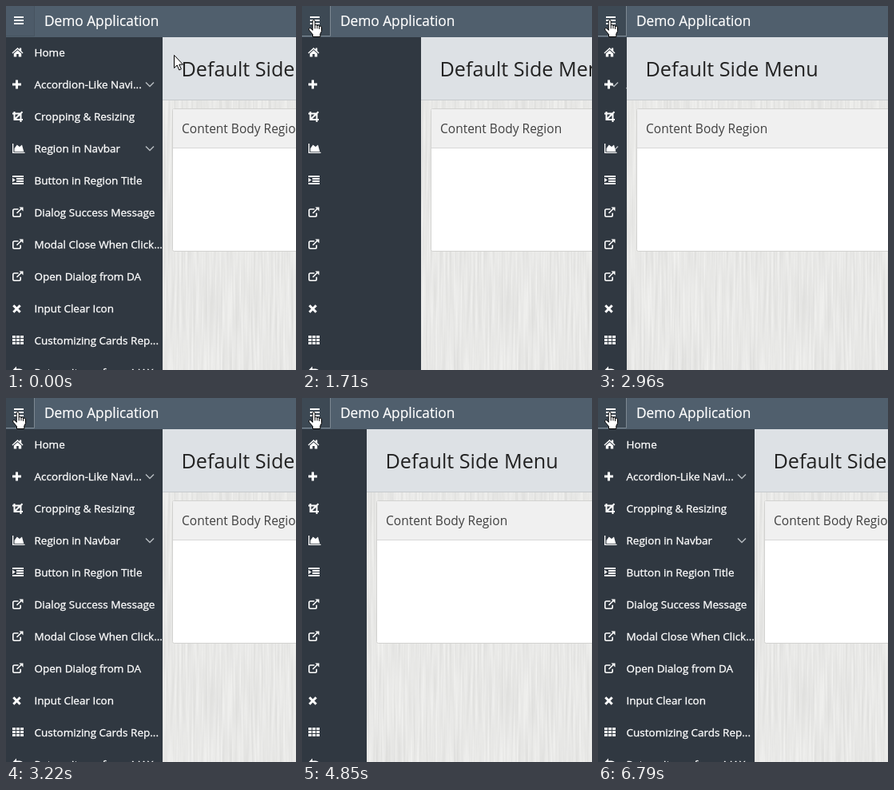
Animation, 363 px wide and 455 px high, one loop 7780 ms. Source, as an HTML page:

```html
<!DOCTYPE html>
<html lang="en">
<head>
<meta charset="utf-8">
<title>Collapsing side menu</title>
<style>
html, body { margin: 0; width: 100%; height: 100%; overflow: hidden; background: #e8e8e6; }
svg { display: block; font-family: "Open Sans", "Noto Sans", sans-serif; }
#labels text { font-size: 13.5px; fill: #fff; stroke: #fff; stroke-width: .3; }
.line { fill: none; stroke: #fff; stroke-width: 2; }
</style>
</head>
<body>
<svg width="363" height="455" viewBox="0 0 363 455">
  <defs>
    <filter id="wood" x="0" y="0" width="100%" height="100%" color-interpolation-filters="sRGB">
      <feTurbulence type="fractalNoise" baseFrequency="0.4 0.012" numOctaves="2" seed="4"/>
      <feColorMatrix values=".12 0 0 0 .85  .12 0 0 0 .85  .12 0 0 0 .843  0 0 0 0 1"/>
    </filter>
    <clipPath id="clip"><rect id="clipBox" y="39" height="416"/></clipPath>
  </defs>

  <rect width="363" height="455" filter="url(#wood)"/>

  <g id="page">
    <rect y="39" width="363" height="79" fill="#dde1e5"/>
    <rect y="117" width="363" height="1" fill="#c6cacd"/>
    <text x="23.4" y="88" font-size="25.2" fill="#222">Default Side Menu</text>
    <rect x="12.5" y="128.5" width="400" height="178" rx="2" fill="#fff" stroke="#d2d2d0"/>
    <rect x="13" y="129" width="400" height="48" fill="#f0f0f0"/>
    <rect x="13" y="177" width="400" height="1" fill="#d8d8d8"/>
    <text x="24" y="159" font-size="15.5" fill="#404040">Content Body Region</text>
  </g>

  <rect id="side" y="39" height="416" fill="#303841"/>
  <g id="labels" clip-path="url(#clip)"></g>
  <g id="icons" fill="#fff">
    <path d="M7.500 58.500L14.500 52l2.500 2.300V52.500h2.200v3.800l2.300 2.200-.8 1L14.500 54 8.300 59.500zM9.800 59.500l4.700-4.200 4.700 4.200V63.500h-3.400v-3.500h-2.600v3.500H9.800z"/>
    <path d="M12 92.500h3V96.500h4v3h-4v4h-3v-4H8v-3h4z"/>
    <path class="line" d="M8 134.500H18.500V145M10.500 132V142H21M10.500 142L20.500 132.200"/>
    <path d="M8 172h1.300v10.700H23.500V184H8zM10.500 182v-4l3.300-4.500 3.200 2.500 3-2.500L22.300 182z"/>
    <path d="M8 212h14v2H8zM13 215h9v2h-9zM13 218h9v2h-9zM8 221h14v2H8zM8 214.800l3.800 2.700L8 220.300z"/>
    <path class="line" style="stroke-width:3" d="M9.300 374.300l8.400 8.400M17.700 374.300l-8.400 8.400"/>
    <path d="M8 455.500l5-5v3h4q5 0 5 6l-2 3q0-4-4-4h-3v3z"/>
  </g>

  <rect width="363" height="39" fill="#505f6d"/>
  <path id="button" d="M-1 37.500H35.500V-1H-1z"/>
  <path d="M10 13h12v2H10zM10 17h12v2H10zM10 21h12v2H10z" fill="#fff"/>
  <text x="47.900" y="25" font-size="17.3" fill="#fff" stroke="#fff" stroke-width=".2">Demo Application</text>

  <circle id="click" cx="17" cy="26" r="30" fill="#f0dc00" fill-opacity=".53"/>
  <path id="arrow" d="M.5.5V16.500L4.200 13l2.600 6 2.500-1.100-2.500-5.800H11.500z" fill="#fff" stroke="#000"/>
  <g id="hand" stroke="#000" stroke-linejoin="round" stroke-linecap="round">
    <path fill="#fff" d="M-.8 13V2Q-.8.5.7.500T2.200 2V7Q3.700 5.600 5 7.400 6.500 6.400 7.600 8.200 10.500 7.500 10.500 10V14.500L8.800 18V21.500H-.5V18.500L-5 13.200Q-6 11.500-4.800 10.800-3.500 10.300-2.400 11.400z"/>
    <path fill="none" d="M2.200 7v4M5 7.600V11M7.600 8.400V11.500"/>
  </g>
</svg>
<script>
const LOOP = 7780, STEP = 80, OPEN = 196, SHUT = 36;
const $ = id => document.getElementById(id);
const set = (el, attrs) => { for (const k in attrs) el.setAttribute(k, attrs[k]); };
const show = (id, on) => set($(id), { visibility: on ? "visible" : "hidden" });
function add(parent, tag, attrs, text) {
  const el = document.createElementNS("http://www.w3.org/2000/svg", tag);
  set(el, attrs);
  if (text) el.textContent = text;
  return parent.appendChild(el);
}

const labels = $("labels"), icons = $("icons");
["Home", "Accordion-Like Navi...", "Cropping & Resizing", "Region in Navbar",
 "Button in Region Title", "Dialog Success Message", "Modal Close When Click...",
 "Open Dialog from DA", "Input Clear Icon", "Customizing Cards Rep...",
 "Return Items from AJAX"
].forEach((s, i) => add(labels, "text", { x: 35.5, y: 63 + 40 * i }, s));

const chevrons = [98, 178].map(y => add(labels, "path", {
  d: `M-5 ${y - 2.5}l5 5 5-5`, fill: "none", stroke: "#b4babf", "stroke-width": 1.5
}));

// Open-in-window icons, then the grid icon
for (let i = 0; i < 3; i++) {
  const g = add(icons, "g", { transform: `translate(8 ${258 + 40 * i})` });
  add(g, "path", { d: "M7.5-4H2.5Q.8-4 .8-2.300V3.500Q.8 5.200 2.500 5.200H8.500Q10.200 5.200 10.200 3.500V.8M5.500 1L11.500-5", class: "line", style: "stroke-width:1.6" });
  add(g, "path", { d: "M8.500-6.500H13.500V-1.500z" });
}
for (let i = 0; i < 9; i++)
  add(icons, "rect", { x: 8 + i % 3 * 5, y: 412 + (i / 3 | 0) * 4, width: 4, height: 3 });

// Each toggle: press, release, slide start, slide end
const toggles = [
  [1380, 1480, 1630, 2240], [2660, 2810, 2890, 3210],
  [4370, 4590, 4690, 5090], [6140, 6290, 6470, 6790]];

function glide(t, start, end, power) {
  if (t >= end) return 1;
  const p = Math.max(0, Math.floor((t - start) / STEP) * STEP / (end - start));
  return 1 - (1 - p) ** power;
}
const mix = (a, b, k) => a + (b - a) * k;

function draw(t) {
  let w = OPEN, open = true, pressed = false;
  toggles.forEach(([press, release, start, end], i) => {
    if (t >= press && t < release) pressed = true;
    if (t < start) return;
    open = i % 2 === 1;
    w = mix(open ? SHUT : OPEN, open ? OPEN : SHUT, glide(t, start, end, 2.5));
  });
  w = Math.round(w);
  set($("page"), { transform: `translate(${w} 0)` });
  set($("side"), { width: w });
  set($("clipBox"), { width: w });
  chevrons.forEach(c => set(c, { transform: `translate(${w - 16} 0)` }));
  show("labels", open);
  show("click", pressed);

  const k = glide(t, 690, 1240, 1.77);
  const x = Math.round(mix(210, 14, k)), y = Math.round(mix(61, 17, k));
  const hover = x < SHUT, link = x < OPEN;
  set($("button"), hover ? { fill: "#3d4954", stroke: "#7d8993" } : { fill: "#4d5b69", stroke: "#475460" });
  show("hand", link);
  show("arrow", !link);
  set($(link ? "hand" : "arrow"), { transform: `translate(${x} ${y})` });
}

const begin = performance.now();
function tick() {
  draw((performance.now() - begin) % LOOP);
  requestAnimationFrame(tick);
}
draw(0);
requestAnimationFrame(tick);
</script>
</body>
</html>
```
